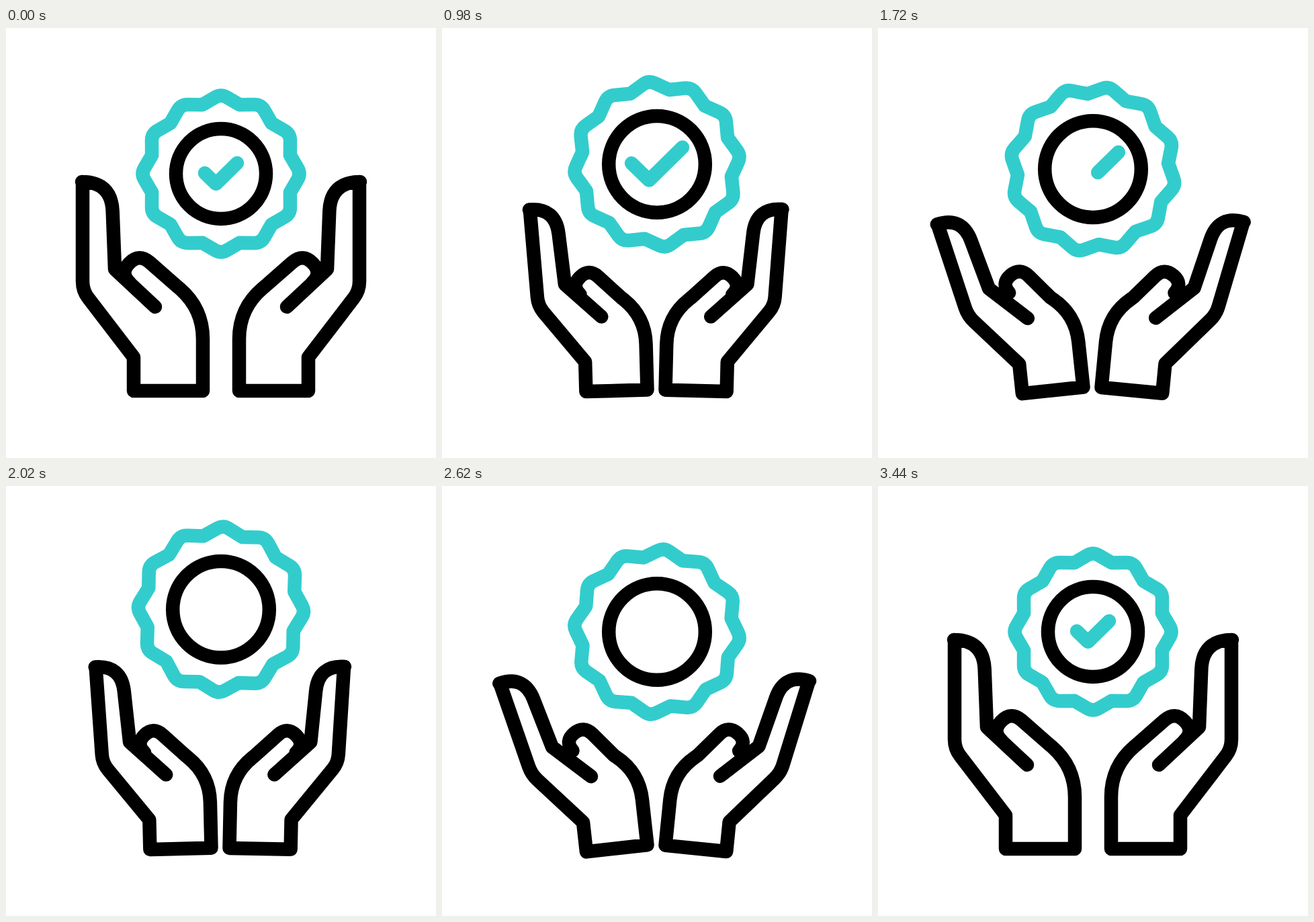
These frames come from a looping animation (640 by 640 pixels, 3600 ms). An HTML page:

```html
<!DOCTYPE html>
<html lang="en">
<head>
<meta charset="utf-8">
<title>Quality in caring hands</title>
<style>
  html, body { margin: 0; width: 100%; height: 100%; overflow: hidden; background: #fff; }
  svg { display: block; width: 100vw; height: 100vh; }
  path, circle { fill: none; stroke: #000; stroke-width: 20.5; stroke-linecap: round; stroke-linejoin: round; }
  .teal { stroke: #33cccc; }
</style>
</head>
<body>
<svg viewBox="0 0 640 640">
  <path id="seal" class="teal"/>
  <circle id="ring" cx="320"/>
  <path id="check" class="teal" pathLength="1"/>
  <path id="left"/>
  <path id="right"/>
</svg>
<script>
const LOOP = 3600, STEP = 20, BEGIN = 200, END = 3440;
const $ = id => document.getElementById(id);
const set = (id, attrs) => {
  for (const name in attrs) $(id).setAttribute(name, attrs[name]);
};

// Share of the span a..b that has passed, plain, eased, or there and back.
const part = (t, a, b) => Math.min(1, Math.max(0, (t - a) / (b - a)));
const ease = (t, a, b) => {
  const u = part(t, a, b);
  return u * u * (3 - 2 * u);
};
const hump = (t, a, b, power) => Math.abs(Math.sin(Math.PI * part(t, a, b))) ** power;

// Turns a point counterclockwise about a centre.
function rotate([x, y], [cx, cy], deg) {
  const a = deg * Math.PI / 180, c = Math.cos(a), s = Math.sin(a);
  return [cx + (x - cx) * c + (y - cy) * s, cy + (y - cy) * c - (x - cx) * s];
}

// Polyline whose corners [x, y, r] are rounded over the length r.
function outline(points, closed) {
  const n = points.length;
  const text = (x, y) => x.toFixed(2) + ' ' + y.toFixed(2);
  const toward = ([x, y, r], [x2, y2]) => {
    const u = r / Math.hypot(x2 - x, y2 - y);
    return text(x + (x2 - x) * u, y + (y2 - y) * u);
  };
  const parts = points.map((p, i) => {
    const at = text(p[0], p[1]);
    if (!p[2]) return at;
    const before = points[(i + n - 1) % n], after = points[(i + 1) % n];
    return toward(p, before) + 'Q' + at + ' ' + toward(p, after);
  });
  return 'M' + parts.join('L') + (closed ? 'Z' : '');
}

// Each joint has a pivot and a bend relative to the lean of the hand.
const palm = { pivot: [0, 0], bend: 0 };
const finger = { pivot: [155, 402], bend: 2 / 3 };
const thumb = { pivot: [234, 381], bend: -2 / 3 };
const crease = { pivot: [217, 460], bend: 2 / 3 };
const HEEL = [293, 540];
const HAND = [
  [222, 415, 0, crease], [162, 359, 0, finger], [157, 229, 44, finger],
  [114, 229, 0, finger], [114, 391, 14, finger], [190, 490, 0, palm],
  [190, 540, 0, palm], [...HEEL, 0, palm], [293, 417, 46, palm],
  [254, 384, 0, palm], [198, 335, 21, thumb], [169, 365, 21, thumb], [184, 379, 0, thumb]];

function hand(k, lean, shift, mirror) {
  const size = 1 - .115 * k;
  return outline(HAND.map(([x, y, r, joint]) => {
    const bent = rotate([x, y], joint.pivot, lean * joint.bend);
    const [px, py] = rotate(bent, HEEL, lean / 3);
    const hx = HEEL[0] + shift + (px - HEEL[0]) * size;
    const hy = HEEL[1] - .3 * lean + (py - HEEL[1]) * size;
    return [mirror ? 640 - hx : hx, hy, r * size];
  }));
}

// Twelve rounded tips with sharp valleys between them.
function seal(cy, size, deg) {
  const points = [];
  for (let i = 0; i < 24; i++) {
    const tip = i % 2 === 0, r = (tip ? 119 : 106.5) * size;
    points.push([...rotate([320, cy - r], [320, cy], -deg - i * 15), tip ? 10 : 0]);
  }
  return outline(points, true);
}

function draw(t) {
  const k = ease(t, BEGIN, 800) - ease(t, 2800, END);
  const lean = 23.3 * (hump(t, 800, 2180, 1.7) + hump(t, 2180, END, 1.7));
  const toss = hump(t, 800, 1600, 2) + hump(t, 1600, 2400, 2) + hump(t, 2910, END, 2);
  const cy = 217 - 33.5 * toss;
  const wobble = 3 * Math.sin(5 * Math.PI * part(t, BEGIN, END));

  set('seal', { d: seal(cy, 1 + .055 * k, 360 * ease(t, BEGIN, END) - wobble) });
  set('ring', { cy, r: 67 + 4.8 * k });
  set('left', { d: hand(k, lean, 12.5 * k, false) });
  set('right', { d: hand(k, lean * .9, 14.5 * k, true) });

  // The large tick is wiped from its start, then a small one is drawn.
  const wiping = t < 2400, size = wiping ? 1 + .58 * k : 1;
  const from = wiping ? ease(t, 1360, 2000) : 0;
  const shown = wiping ? 1 - from : ease(t, 2720, 3200);
  const tick = [[-24, -1], [-7.5, 15], [24, -16]];
  set('check', {
    d: outline(tick.map(([x, y]) => [320 + x * size, cy + y * size])),
    'stroke-dasharray': shown + ' 2',
    'stroke-dashoffset': -from,
    visibility: shown < .002 ? 'hidden' : 'visible'
  });
}

const start = performance.now();
function frame() {
  const t = (performance.now() - start) % LOOP;
  draw(Math.floor(t / STEP) * STEP);
  requestAnimationFrame(frame);
}
frame();
</script>
</body>
</html>
```
